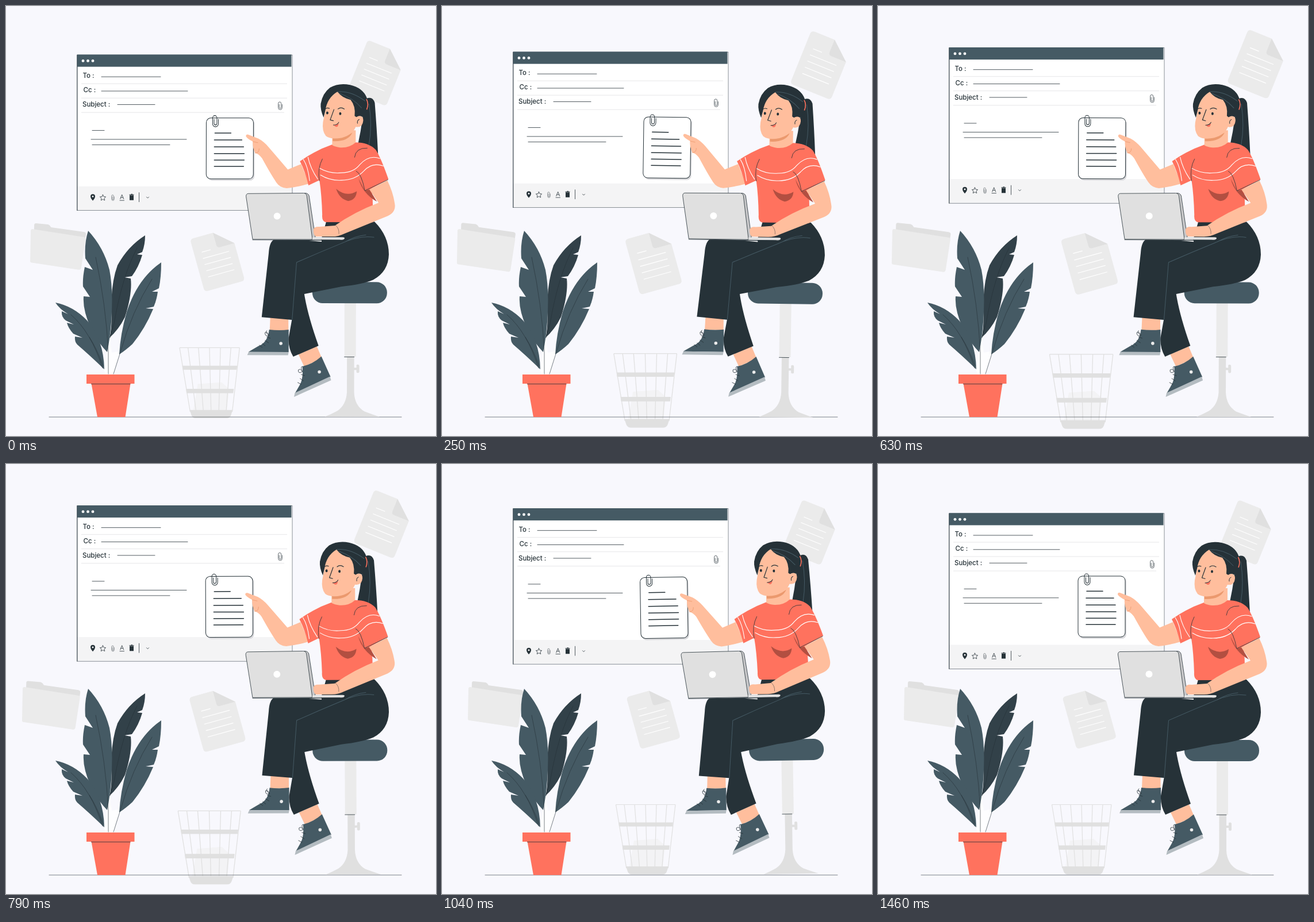
Animation of 748x748 px, one loop 1500 ms. Source, as an HTML page:

```html
<!DOCTYPE html>
<html lang="en">
<head>
<meta charset="utf-8">
<title>Mail attachment</title>
<style>
html, body { margin: 0; width: 100%; height: 100%; overflow: hidden; background: #f8f8fd; }
svg { display: block; width: 100vw; height: 100vh; }
text { font: 500 11.5px Inter, "Open Sans", sans-serif; fill: #263238; }
.slate { fill: #455a64; } .dark { fill: #263238; } .coral { fill: #ff725e; }
.skin { fill: #ffbe9d; } .mid { fill: #e0e0e0; } .pale { fill: #ebebeb; } .white { fill: #fff; }
.ink, .wave, .seam { fill: none; stroke: #263238; stroke-width: .8; stroke-linecap: round; stroke-linejoin: round; }
.wave { stroke: #fff; stroke-width: 1.1; }
.seam { stroke: #455a64; stroke-width: 1; }
</style>
</head>
<body>
<svg viewBox="0 0 748 748">
<defs>
  <g id="page">
    <path class="pale" d="M6 0H41L72 27V88Q72 94 66 94H6Q0 94 0 88V6Q0 0 6 0Z"/>
    <path class="mid" d="M41 0L72 27H46Q41 27 41 22Z"/>
    <path class="wave" d="M14 27H29M13 38H59M13 49H59M13 60H59M13 71H59"/>
  </g>
  <path id="clip" class="ink" d="M-2 -2V3.500A2 2 0 0 0 2 3.500V-4A3 3 0 0 0 -4 -4V4A4 4 0 0 0 4 4V-2"/>
</defs>

<g id="items">
  <use href="#page" transform="translate(627 62) rotate(22)"/>
  <use href="#page" transform="translate(320.500 405.500) rotate(-15.500)"/>
  <path class="mid" d="M55 378L76 380Q79 381 81 385L138 393Q142 394 141 398L132 456L50 440L52 381Q52 378 55 378Z"/>
  <path class="pale" d="M49 388L138 402Q141 403 140.500 406L133 455Q132 459 128 458L48 446Q45 446 45 443L46 391Q46 388 49 388Z"/>
  <path d="M334 655L375 652L388 664L384 701H326Z" fill="#f3f3f5"/>
  <path id="wires" fill="none" stroke="#e0e0e0" stroke-width="1.200"/>
  <path class="mid" d="M307 623.500H402L401 630.500H308ZM313.500 663.500H396L395 671H314.500ZM320 700H394L391 709Q389 714 384 714H330Q325 714 323 709Z"/>
</g>

<g id="mail">
  <rect class="white" x="124" y="86" width="374" height="270.500"/>
  <rect x="124" y="314.500" width="374" height="42" fill="#f4f4f5"/>
  <rect x="124" y="86" width="374" height="270.500" fill="none" stroke="#59636a" stroke-width=".7"/>
  <path class="ink" d="M123.700 86V356.500"/>
  <rect class="slate" x="124" y="85.300" width="372.500" height="21.200"/>
  <g class="white"><circle cx="134" cy="96.300" r="2.400"/><circle cx="142.500" cy="96.300" r="2.400"/><circle cx="151" cy="96.300" r="2.400"/></g>
  <path d="M131 136H489M131 161H489M131 186H484" stroke="#e6e6e8" stroke-width="1"/>
  <text x="133.500" y="126">To :</text>
  <text x="134.500" y="151">Cc :</text>
  <text x="133" y="176.300" textLength="">Subject :</text>
  <path class="ink" d="M166 124H269M166 148.800H316M194 172.300H259M150 217.300H171M148 232.800H314M150 242.300H285"/>
  <use href="#clip" transform="translate(477 174) scale(.85 .9)"/>
  <path class="dark" fill-rule="evenodd" d="M151 339.500Q147 335 147 332A4 4 0 0 1 155 332Q155 335 151 339.500ZM149.500 332a1.500 1.500 0 1 0 3 0a1.500 1.500 0 1 0 -3 0ZM215 330H222V338.500H215ZM214.500 328.500H217L218 327.500H219.500L220.500 328.500H222.500V329.500H214.500Z"/>
  <path id="star" class="ink"/>
  <use href="#clip" transform="translate(186 334) scale(.55 .65)"/>
  <path class="ink" d="M198.700 336.500L201.700 329L204.700 336.500M199.700 334H203.700M198 339H205.500M231.500 325.500V341.500M244.500 333L246.500 335L248.500 333"/>
</g>

<path class="ink" d="M75 715H688" stroke-opacity=".75"/>

<g id="plant">
  <path class="white" d="M170 630L176 601L180 575L184 603L200 600Q191 620 187 642H173Z" opacity=".85"/>
  <path d="M242 399Q242 415 237 428L228 432L237 433Q231 454 219 470L206 472L217 474Q220 500 207 541Q196 563 180 577Q185 560 183 520Q184 478 194 451Q212 418 242 399Z" fill="#324149"/>
  <path class="slate" d="M143 391Q170 420 180 459Q187 495 183 550Q181 578 176 602Q149 574 138 534Q134 519 135 505L146 506L134 488Q133 473 137 454L151 459L138 439Q136 412 143 391Z"/>
  <path class="slate" d="M270 446Q270 472 266 491L254 497L264 497Q262 512 257 523L243 526L256 527Q242 561 220 588Q208 599 197 606Q199 570 210 532Q229 474 270 446Z"/>
  <path class="slate" d="M86 516Q117 522 141 547Q170 580 171 632Q145 607 124 589Q119 584 120 575L133 577L117 570Q108 560 106 551L118 554L104 547Q96 541 97 531L108 536Q93 527 86 516Z"/>
  <path class="ink" d="M156 437Q174 520 178 602V640M228 421Q202 470 188 552L181 577M254 475Q219 531 199 602L187 640M113 537Q148 567 168 630M145 576Q158 596 169 626" stroke-opacity=".75"/>
  <path class="coral" d="M140 641H223.500V657H216.500L207.500 715H159L148.500 657H140Z"/>
  <path class="ink" d="M148.500 657.500H216"/>
</g>

<g id="person">
  <g id="stool">
    <path class="pale" d="M589 514H609V610H589Z"/>
    <path class="mid" d="M593.500 610H606V629H610V625Q610 623.500 612 623.500H613Q615 623.500 615 626V636Q615 638 613 638H612Q610 638 610 636V633H606V672Q607 695 624 705Q640 711 651 714.500H555Q566 710 577 704Q592 694 593.500 672Z"/>
    <path class="ink" d="M589 610.300H606"/>
    <rect class="slate" x="533" y="480" width="130" height="37" rx="18"/>
  </g>

  <g id="sheet">
    <rect x="350" y="197" width="82" height="107" rx="8" fill="#d9d9dc"/>
    <rect class="white" x="348" y="195" width="82" height="106" rx="8" stroke="#263238" stroke-width="1"/>
    <path class="ink" stroke-width="1.500" style="stroke-width:1.500" d="M363 221.300H391M362 233.300H410M362 245.300H413M362 257H414M362 268.300H414M362 279.300H413"/>
    <use href="#clip" transform="translate(364 200) scale(1.250 1.300)"/>
  </g>

  <g id="legs">
    <path class="skin" d="M509 606L541 592L550 613L519 627Z"/>
    <path class="slate" d="M516 627Q534 623 549 609.500L565 645L503 674L511 660Q518 649 516 627Z"/>
    <path d="M503 673L564 644.500L566 651L501.500 680Z" fill="#b4bcc1"/>
    <path class="skin" d="M460 540H491.500V564H459Z"/>
    <path class="slate" d="M458 563Q476 565 492 563V602H422L439 592Q456 585 458 563Z"/>
    <path d="M422.500 602H492L491 607.500H420Z" fill="#b4bcc1"/>
    <g class="pale"><circle cx="478.500" cy="587" r="2.800"/><circle cx="545.500" cy="636.500" r="2.800"/></g>
    <path class="ink" d="M441 590L446 594M446 587L451 591M451 582L457 586M454 576L460 578M457 574Q450 575 451 568Q456 567 458 573M457 573Q450 566 454 565M508 655L514 658M512 648L518 652M514 641L520 643M516 636Q508 641 509 633Q513 630 516 636Q512 627 516 627"/>
    <path class="dark" d="M557 375H641Q666 400 666 432Q665 462 639 476Q620 484 583 488L519 501Q525 538 544 591L500 610Q491 595 492 577L497.500 546L445 541.500L457 430Q458 412 465 407H548Z"/>
    <path class="seam" d="M498 545L505.500 446Q544 429 583 413Q615 398 640 402M590 410Q607 400 626 398"/>
  </g>

  <g id="ponytail">
    <path class="dark" d="M626 161Q637 156 641 168Q645 218 647 261Q632 246 610 250Q617 218 621 187Z"/>
    <path class="seam" d="M631 170Q637 207 631 241" stroke-width=".7"/>
  </g>

  <g id="body">
    <path class="skin" d="M513 275L490 284.500L456 245Q448 236 439 231L421 224Q417 223 417 227Q419 231 429 236Q428 245 433 256Q439 257 445 265Q461 294 470 307Q476 316 488 317Q507 315 527 309Z"/>
    <path d="M429 236L438 238M433 256Q440 256 440 248" fill="none" stroke="#eb996e" stroke-width=".8"/>
    <path class="coral" d="M511 270Q538 251 567 241L607 237Q631 237 643 250Q652 264 665 301L636 317Q639 345 638 376H556Q549 374 550 363Q549 329 545 303L526 312Q520 287 511 270Z"/>
    <path d="M574 318Q592 333 610 322Q609 337 595 339Q580 336 574 318ZM613 300Q620 326 645 340L632 319L624 321Z" fill="#b24f41"/>
    <path class="wave" d="M525 263Q529 282 542 301M517 267Q525 279 528 304M545 282Q562 292 583 290Q604 290 615 276Q631 258 650 265M547 294Q563 304 583 303Q607 303 622 287Q636 271 656 278"/>
    <path class="ink" d="M550 266Q541 283 545 304M606 263Q608 246 628 247M609 287Q618 291 624 321L664 302"/>
    <path class="skin" d="M567 216H608V237Q597 247 581 246Q572 245 567 242Z"/>
    <path d="M568 229Q584 232 602 220Q595 236 568 235Z" fill="#eb996e"/>
  </g>

  <g id="head">
    <path class="skin" d="M556 161Q563 149 577 148Q594 147 606 163L610 192Q621 188 621 199Q620 212 608 210Q602 224 584 229Q565 233 556 226Q549 217 551 202L555 182Z"/>
    <path class="dark" d="M552 194Q546 180 547 170Q550 152 563 142Q578 133 598 137Q620 142 627 159Q631 174 620 193Q615 189 609 193L606 191Q608 174 599 163Q584 160 576 149Q558 160 555 182Z"/>
    <path class="seam" d="M576 149Q600 147 624 165M580 152Q603 160 618 177" stroke-width=".7"/>
    <path d="M626.500 162Q631 170 627 180" fill="none" stroke="#ff725e" stroke-width="1.600"/>
    <g class="dark"><ellipse cx="558.500" cy="186" rx="2" ry="2.500"/><ellipse cx="581" cy="187" rx="2" ry="2.500"/></g>
    <path class="ink" style="stroke-width:1.200" d="M554 180Q557 176 562 178M577 179Q582 175 588 179M570 180L563.500 198L569 199.500"/>
    <path class="coral" d="M569 207Q575 207 578 203Q578 211 573 210Z"/>
    <path class="ink" style="stroke-width:1" d="M569 207Q576 207 578.500 202M614 197Q610 199 611 204"/>
  </g>

  <g id="laptop">
    <path d="M519 325.500Q525 325 527 330L538 402L531 406Z" fill="#c7c7c9" stroke="#263238" stroke-width=".8"/>
    <path class="mid" d="M421 326.500L517 325.500Q522 325.500 523 330L533 406H429L417.500 332Q417 327 421 326.500Z" stroke="#263238" stroke-width=".8"/>
    <path class="mid" d="M533 402H586Q589 402 589 404Q588 406.500 584 406.500H533Z"/>
    <path class="ink" d="M429 407H581"/>
    <path class="white" d="M527 408H549V410Z"/>
    <circle class="white" cx="471.500" cy="365.500" r="6"/>
    <path class="skin" d="M632 319L663 303Q673 323 676 343Q679 358 664 365L588 396Q578 401 567 401H539Q534 398 535 388Q537 383 545 384L572 382Q606 358 648 342Q641 332 632 319Z"/>
    <path class="ink" d="M573 381Q580 387 579 396" stroke-opacity=".6"/>
  </g>
</g>
</svg>

<script>
const LOOP = 1500, FRAMES = 36;
const el = id => document.getElementById(id);
const linear = p => p;
const smooth = p => p * p * (3 - 2 * p);

// keys: [progress, value] pairs
function track(keys, p, ease = linear) {
  const i = keys.findIndex(k => k[0] >= p);
  if (i < 1) return keys[0][1];
  const [a, u] = keys[i - 1], [b, v] = keys[i];
  return u + (v - u) * ease((p - a) / (b - a));
}

const lift = [[0, 0], [.5, -15], [1, 0]];
const sway = [[0, 0], [.25, 1], [.75, -1], [1, 0]];
const beat = [[0, 1], [.14, 1.09], [.28, 1], [.355, 1], [.49, 1.09], [.64, 1], [1, 1]];

// Tapered basket wires and rim
const tops = [302.5, 317, 335, 354, 373, 391, 406];
el("wires").setAttribute("d", "M302.5 592.500H406" +
  tops.map(x => `M${x} 592.500L${357 + (x - 354.2) * .7} 703`).join(""));

el("star").setAttribute("d", "M" + Array.from({ length: 10 }, (_, i) => {
  const a = i * Math.PI / 5, r = i % 2 ? 2.6 : 5.4;
  return `${168.5 + r * Math.sin(a)} ${334.5 - r * Math.cos(a)}`;
}).join("L") + "Z");

function draw() {
  const step = Math.floor((performance.now() % LOOP + 4) * FRAMES / LOOP);
  const p = ((step + 1) % FRAMES) / FRAMES;
  el("mail").setAttribute("transform", `translate(0 ${track(lift, p)})`);
  el("person").setAttribute("transform", `rotate(${track(sway, p)} 512 425)`);
  el("items").setAttribute("transform",
    `translate(364 389) scale(${track(beat, p, smooth)}) translate(-364 -389)`);
  requestAnimationFrame(draw);
}
draw();
</script>
</body>
</html>
```
